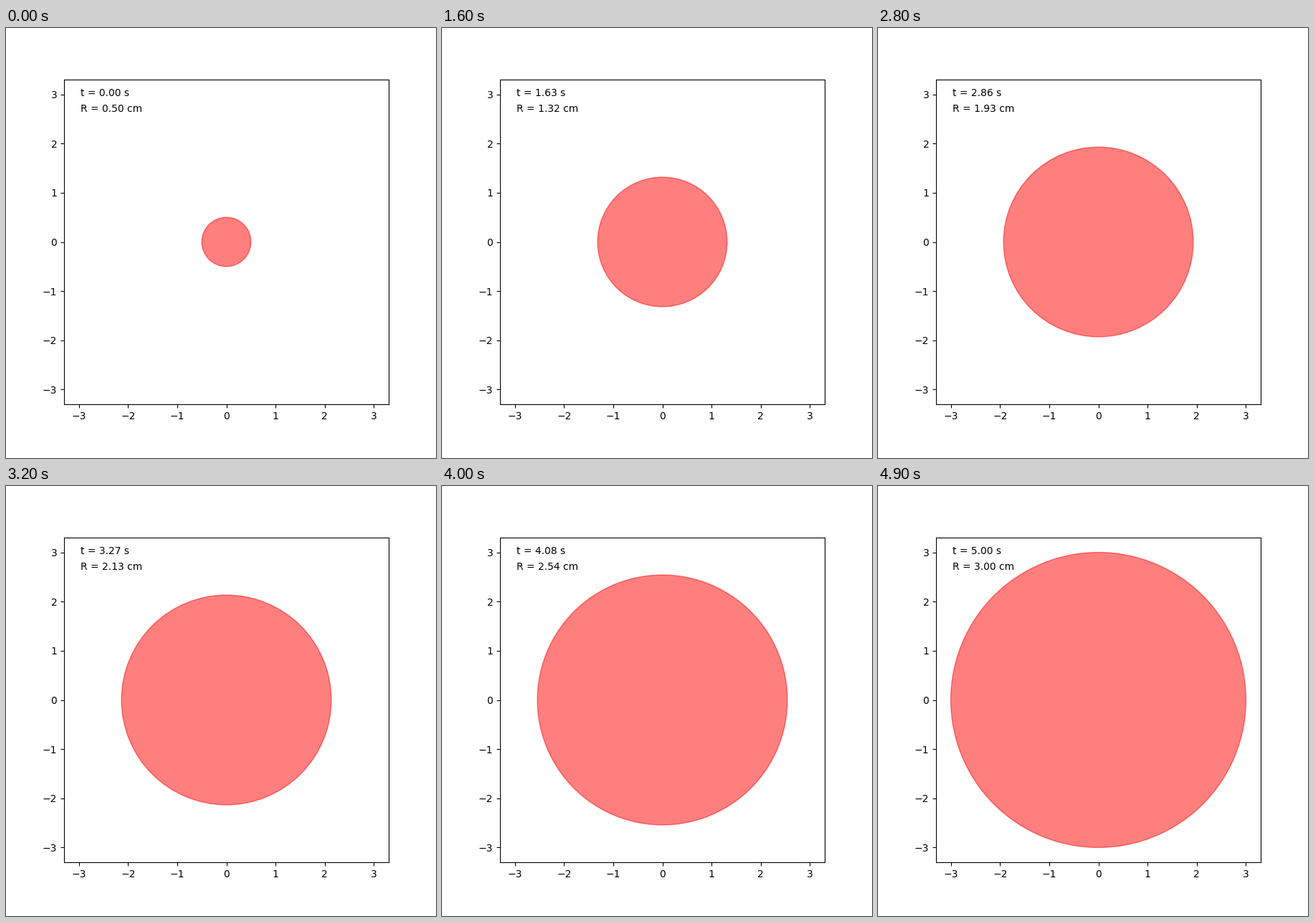
A matplotlib script for the animation above (5 s loop, 600 by 600 pixels).

```python
import matplotlib.pyplot as plt
import numpy as np
from matplotlib.animation import FuncAnimation

FRAMES = 50
START_RADIUS = 0.5  # cm
GROWTH = 0.5        # cm per second
times = np.linspace(0, 5, FRAMES)

fig, ax = plt.subplots(figsize=(6, 6), dpi=100)
fig.subplots_adjust(left=0.125, right=0.9, bottom=0.125, top=0.88)
ax.set_aspect("equal")
ax.set(xlim=(-3.3, 3.3), ylim=(-3.3, 3.3))

disc = ax.add_patch(plt.Circle((0, 0), START_RADIUS, color="red", alpha=0.5))
time_label = ax.text(0.05, 0.95, "", transform=ax.transAxes)
radius_label = ax.text(0.05, 0.90, "", transform=ax.transAxes)


def update(frame):
    t = times[frame]
    radius = START_RADIUS + GROWTH * t
    disc.set_radius(radius)
    time_label.set_text(f"t = {t:.2f} s")
    radius_label.set_text(f"R = {radius:.2f} cm")
    return disc, time_label, radius_label


anim = FuncAnimation(fig, update, frames=FRAMES, interval=100,
                     repeat=True, repeat_delay=0)
plt.show()
```
